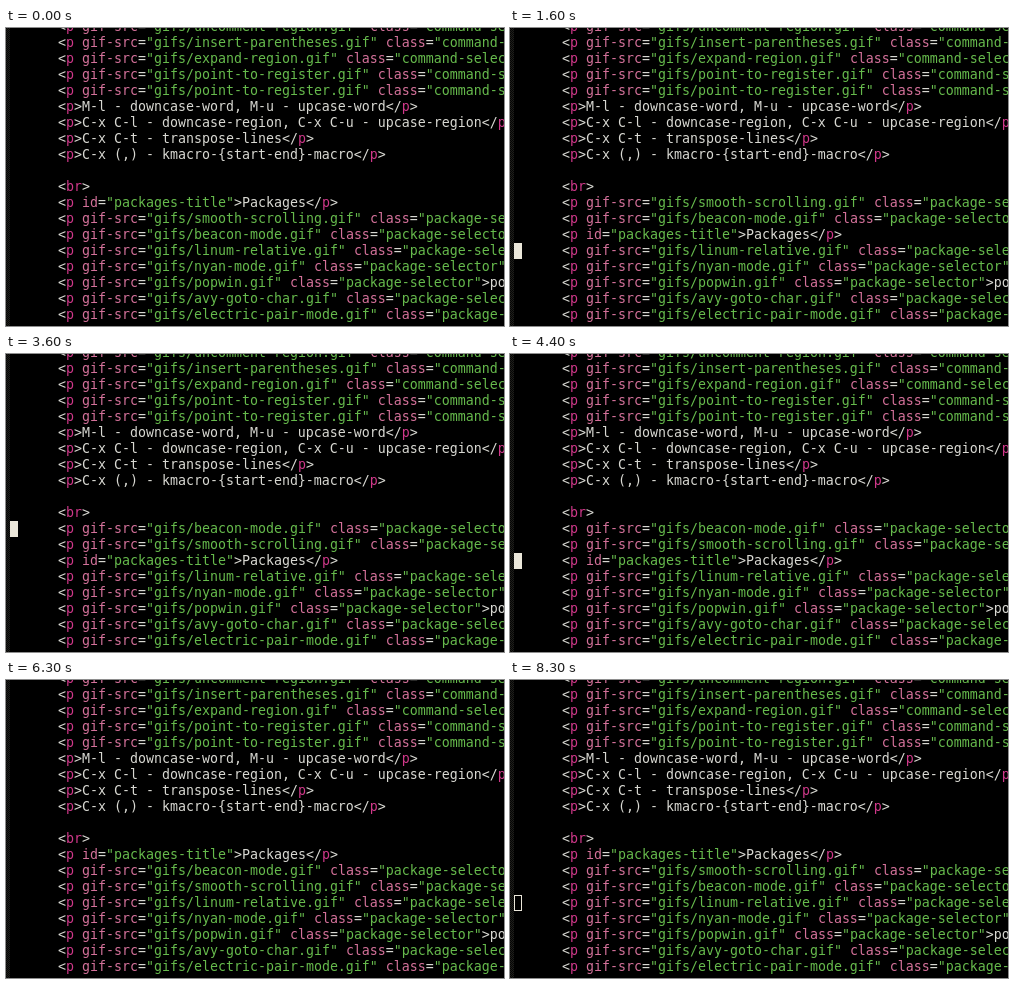
An HTML page that plays this animation: 498 by 298 pixels, repeating every 8400 ms.

```html
<!DOCTYPE html>
<html lang="en">
<head>
<meta charset="utf-8">
<title>Transposing lines</title>
<style>
  html, body { margin: 0; width: 100%; height: 100%; overflow: hidden; background: #000; }
  #stage {
    position: relative; width: 498px; height: 298px; overflow: hidden;
    background: #000; color: #d8d8d2;
    font: 13.29px/16px "DejaVu Sans Mono", monospace;
    font-variant-ligatures: none;
  }
  .line { position: absolute; left: 4px; height: 16px; white-space: pre; }
  .tag { color: #d0388a; }
  .attr { color: #d4719a; }
  .str { color: #66ba4c; }
  #fringe {
    position: absolute; left: 0; top: 0; width: 4px; height: 298px;
    background: repeating-conic-gradient(#1e1e1a 0 25%, #060606 0 50%) 0 0 / 2px 2px;
  }
  #cursor {
    position: absolute; left: 4px; width: 8px; height: 16px;
    box-sizing: border-box; border: 1px solid #ebe7da; background: #ebe7da;
  }
  #cursor.hollow { background: none; }
</style>
</head>
<body>
<div id="stage"><div id="fringe"></div><div id="cursor"></div></div>
<script>
const LOOP = 8400, BLINK = 500, BLUR = 8200;
const LINE = 16, TOP = -9, FIRST = 11;

const stage = document.getElementById('stage');
const cursor = document.getElementById('cursor');

const item = (kind, name) => `<p gif-src="gifs/${name}.gif" class="${kind}-selector">${name}</p>`;
const command = name => item('command', name);
const pkg = name => item('package', name);

const source = [
  command('uncomment-region'),
  command('insert-parentheses'),
  command('expand-region'),
  command('point-to-register'),
  command('point-to-register'),
  '<p>M-l - downcase-word, M-u - upcase-word</p>',
  '<p>C-x C-l - downcase-region, C-x C-u - upcase-region</p>',
  '<p>C-x C-t - transpose-lines</p>',
  '<p>C-x (,) - kmacro-{start-end}-macro</p>',
  '',
  '<br>',
  '<p id="packages-title">Packages</p>',
  pkg('smooth-scrolling'),
  pkg('beacon-mode'),
  pkg('linum-relative'),
  pkg('nyan-mode'),
  pkg('popwin'),
  pkg('avy-goto-char'),
  pkg('electric-pair-mode')
];

const span = (type, text) => `<span class="${type}">${text}</span>`;

function highlight(text) {
  return text.replace(/(<\/?)(\w+)|([\w-]+)(=)("[^"]*")|[<>]/g,
    (all, open, tag, attr, equals, value) => {
      if (tag) return open.replace('<', '&lt;') + span('tag', tag);
      if (attr) return span('attr', attr) + equals + span('str', value);
      return all === '>' ? '&gt;' : '&lt;';
    });
}

const rowTop = row => TOP + row * LINE + 'px';

const lines = source.map((text, row) => {
  const el = document.createElement('div');
  el.className = 'line';
  el.style.top = rowTop(row);
  el.innerHTML = '      ' + highlight(text);
  stage.insertBefore(el, cursor);
  return el;
});

const movable = { t: lines[FIRST], s: lines[FIRST + 1], b: lines[FIRST + 2] };

// Key presses: time, resulting line order, cursor row
const keys = [
  [-600, 'tsb', 1],
  [700, 'stb', 2],
  [1200, 'sbt', 3],
  [1900, 'sbt', 2],
  [2100, 'sbt', 1],
  [2700, 'bst', 2],
  [3200, 'bst', 1],
  [3400, 'bst', 0],
  [4000, 'bst', 1],
  [4200, 'bst', 2],
  [4600, 'bts', 3],
  [4900, 'bts', 2],
  [5100, 'bts', 1],
  [5600, 'tbs', 2],
  [6800, 'tsb', 3]
];

function draw(time) {
  const [pressed, order, row] = keys.filter(key => key[0] <= time).pop();
  [...order].forEach((id, i) => { movable[id].style.top = rowTop(FIRST + i); });

  const blurred = time >= BLUR;
  const lit = Math.floor((time - pressed) / BLINK) % 2 === 0;
  cursor.style.top = rowTop(FIRST + row);
  cursor.style.visibility = blurred || lit ? 'visible' : 'hidden';
  cursor.classList.toggle('hollow', blurred);
}

const start = performance.now();
function tick() {
  draw((performance.now() - start) % LOOP);
  requestAnimationFrame(tick);
}
draw(0);
requestAnimationFrame(tick);
</script>
</body>
</html>
```
